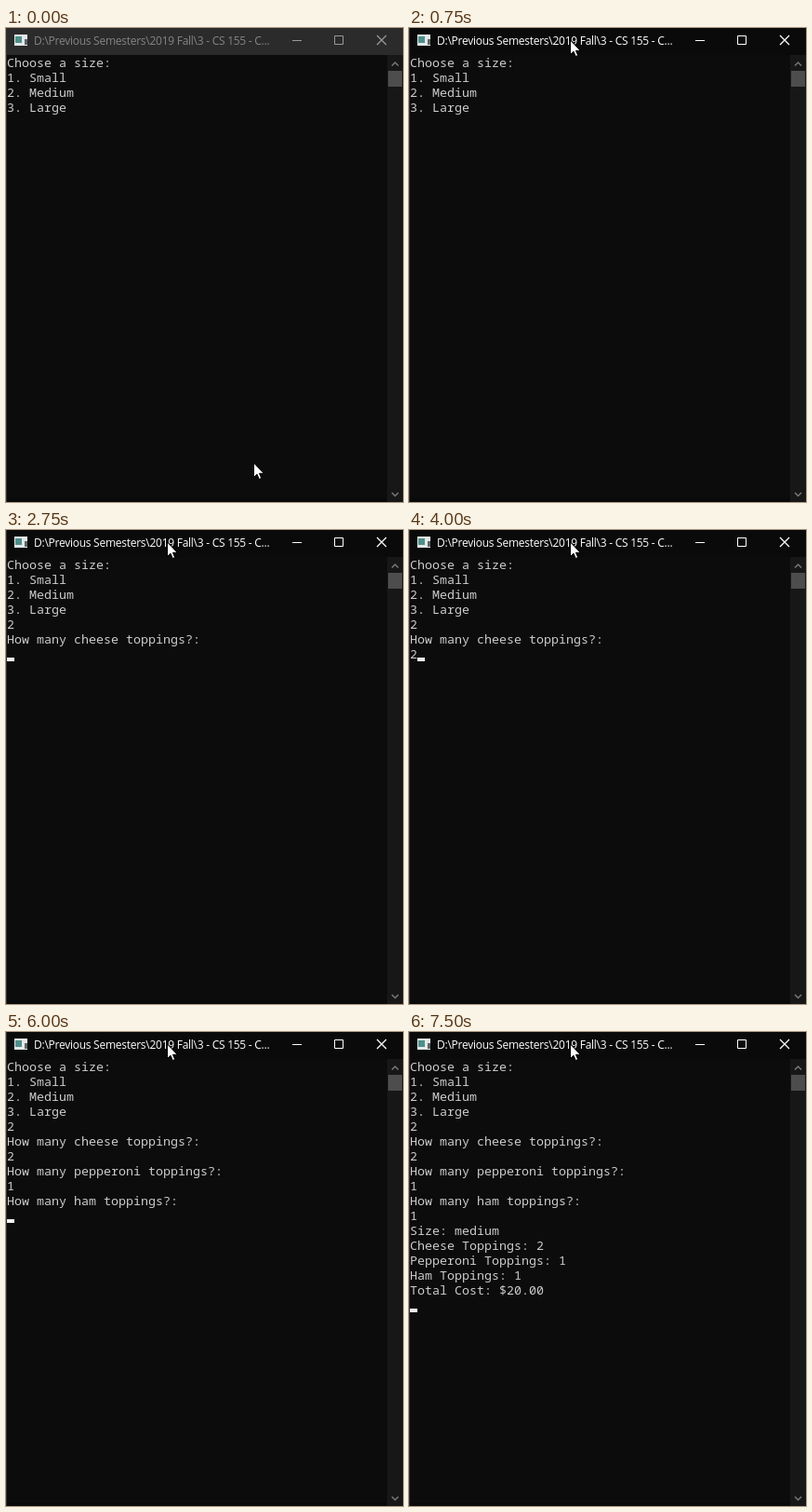
Write an HTML page that moves like this. It is 427 by 509 pixels and loops after 8 s.

```html
<!DOCTYPE html>
<html lang="en">
<head>
<meta charset="utf-8">
<title>Console</title>
<style>
  html, body { margin: 0; width: 100%; height: 100%; overflow: hidden; background: #0c0c0c; }
  svg { display: block; width: 427px; height: 509px; }
  .title { font: 12px "Open Sans", "Noto Sans", sans-serif; letter-spacing: -.26px; }
  .console { font: 13.333px "Noto Sans Mono", "Liberation Mono", monospace; fill: #ccc; white-space: pre; }
  .crisp { shape-rendering: crispEdges; }
</style>
</head>
<body>
<svg viewBox="0 0 427 509">
  <rect width="427" height="509" fill="#0c0c0c"/>
  <g class="crisp">
    <rect id="bar" width="427" height="29"/>
    <rect y="505" width="427" height="4" fill="#090909"/>
    <rect x="410" y="29" width="17" height="480" fill="#171717"/>
    <rect x="411" y="46" width="15" height="17" fill="#4d4d4d"/>
    <rect width="1" height="509" fill="#303030"/>
    <rect x="9" y="7" width="14" height="12" fill="#e4e8e8"/>
    <rect x="10" y="9" width="7" height="7" fill="#4f8f8a"/>
    <rect x="20" y="12" width="3" height="6" fill="#5c6666"/>
  </g>
  <path d="M415 40.500l3.500-3.500 3.500 3.500M415 499l3.500 3.500 3.500-3.500" fill="none" stroke="#777" stroke-width="1.500"/>
  <text id="title" class="title" x="30" y="18">D:\Previous Semesters\2019 Fall\3 - CS 155 - C...</text>
  <g id="buttons" fill="none">
    <path d="M308 13.500h10M353.500 8.500h9v9h-9z"/>
    <path d="M399 8l10 10M409 8l-10 10" stroke-width="1.300"/>
  </g>
  <g id="lines" class="console"></g>
  <rect id="caret" class="crisp" width="8" height="4" fill="#f2f2f2"/>
  <path id="mouse" d="M.5 1V16.500L4 13.200L6.300 18.500L8.700 17.500L6.500 12.300H11.300Z" fill="#fff" stroke="#000"/>
</svg>
<script>
const LOOP = 8000, ROW = 16, CELL = 8, FOCUS = 750;
const byId = id => document.getElementById(id);

// Everything written to the console, with the time it appears
const output = [
  [0, "Choose a size:\n1. Small\n2. Medium\n3. Large\n"],
  [2500, "2"],
  [2750, "\nHow many cheese toppings?:\n"],
  [4000, "2"],
  [4250, "\nHow many pepperoni toppings?:\n"],
  [5750, "1\n"],
  [6000, "How many ham toppings?:\n"],
  [7500, "1\nSize: medium\nCheese Toppings: 2\nPepperoni Toppings: 1\n" +
         "Ham Toppings: 1\nTotal Cost: $20.00\n"]
];
const mousePath = [[266, 466], [167, 66], [173, 12]];

const printed = t => output.filter(([at]) => at <= t).map(([, s]) => s).join("").split("\n");

const rows = printed(LOOP).map((_, i) => {
  const el = document.createElementNS("http://www.w3.org/2000/svg", "text");
  el.setAttribute("x", 1);
  el.setAttribute("y", 42 + i * ROW);
  byId("lines").append(el);
  return el;
});

// The caret blinks evenly while idle, then stays lit longer after each answer
function caretOn(t) {
  if (t >= 2500) return (t - 2500) % 1500 < 1000;
  return t >= 1250 && (t - 1250) % 1000 < 500;
}

function set(id, attrs) {
  for (const key in attrs) byId(id).setAttribute(key, attrs[key]);
}

function draw(t) {
  const lines = printed(t);
  const row = lines.length - 1;
  const focused = t >= FOCUS;
  const step = Math.min(mousePath.length - 1, Math.floor(t / 250));

  rows.forEach((el, i) => { el.textContent = lines[i] || ""; });
  set("caret", {
    x: 1 + lines[row].length * CELL,
    y: 41 + row * ROW,
    visibility: caretOn(t) ? "visible" : "hidden"
  });
  set("mouse", { transform: `translate(${mousePath[step]})` });
  set("bar", { fill: focused ? "#0a0a0a" : "#2b2b2b" });
  set("title", { fill: focused ? "#fff" : "#858585" });
  set("buttons", { stroke: focused ? "#fff" : "#999" });
}

const start = performance.now();
function tick(now) {
  draw(Math.max(0, now - start) % LOOP);
  requestAnimationFrame(tick);
}
draw(0);
requestAnimationFrame(tick);
</script>
</body>
</html>
```
